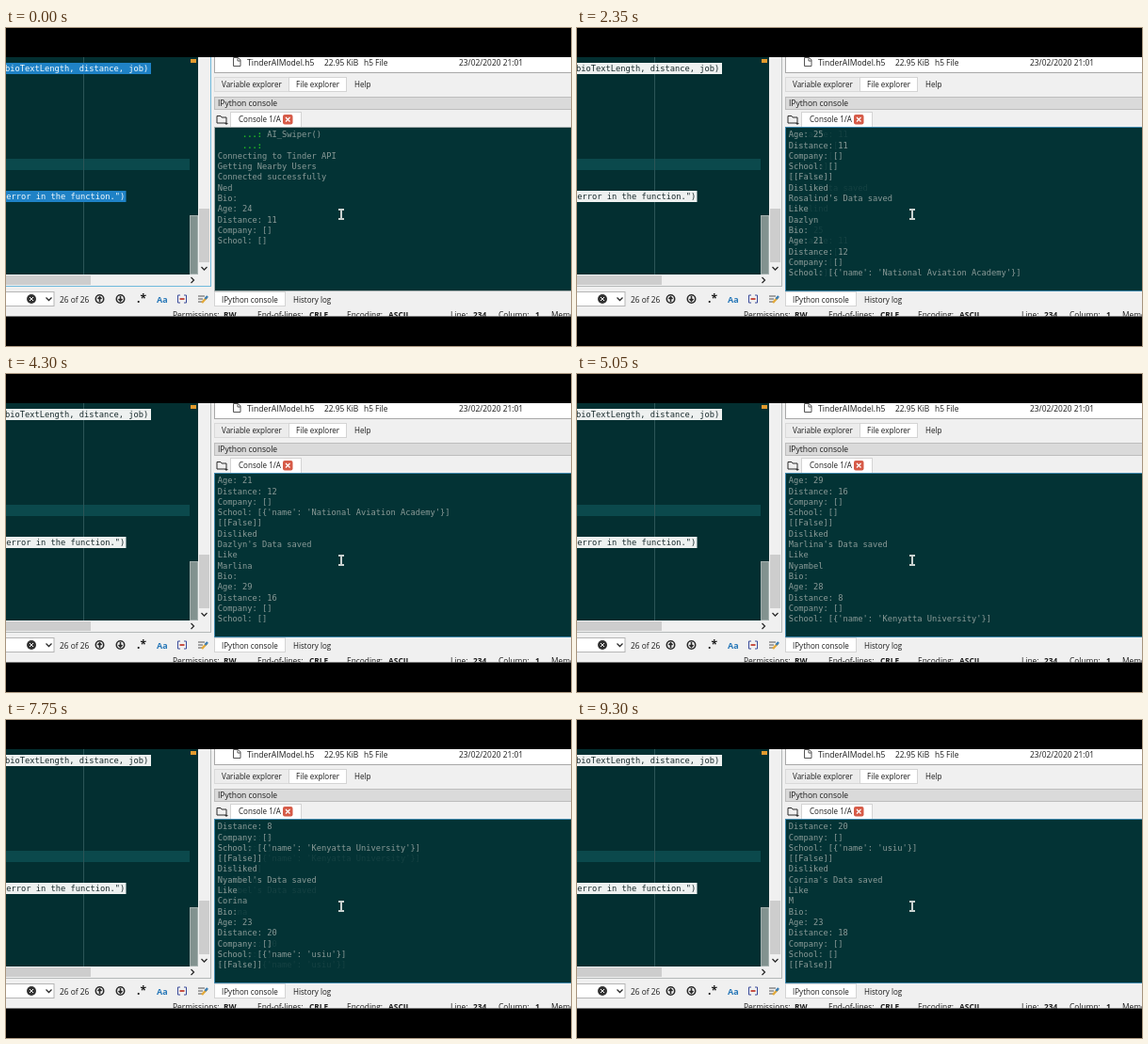
An HTML page for the animation above (9350 ms loop, 600 by 338 pixels).

```html
<!DOCTYPE html>
<html lang="en">
<head>
<meta charset="utf-8">
<title>Console run</title>
<style>
  html, body { margin: 0; width: 100%; height: 100%; overflow: hidden; background: #000; }
  svg { display: block; width: 100%; height: 100%; }
  text { font: 8.4px "Open Sans", sans-serif; fill: #1c1c1c; white-space: pre; }
  .tab { font-size: 8.05px; }
  .bold { font-weight: 700; }
  .code, .console text { font: 8.73px "DejaVu Sans Mono", monospace; }
  .console text { fill: #8b9b98; }
  .console .prompt { fill: #20b526; font-weight: 700; }
  .selection { fill: #eef1f0; }
  .code { fill: #17292b; }
  .editing .selection { fill: #1f82c6; }
  .editing .code { fill: #f4fafc; }
  .pane-border { fill: none; stroke: #3f87ab; }
  .editing .pane-border { stroke: #a5adad; }
  .editor-border { fill: none; stroke: #b4b8b8; }
  .editing .editor-border { stroke: #6fb9dc; }
  .icon { fill: none; stroke: #2b2b2b; stroke-width: 1.3; }
</style>
</head>
<body>
<svg id="stage" viewBox="0 0 600 338">
  <defs>
    <clipPath id="screen"><rect y="31" width="600" height="275.500"/></clipPath>
    <clipPath id="pane"><rect x="222" y="106" width="378" height="173"/></clipPath>
  </defs>
  <rect width="600" height="338"/>
  <g clip-path="url(#screen)">
    <rect y="31" width="600" height="276" fill="#f0f0f0"/>

    <!-- Editor -->
    <rect y="31" width="204" height="231" fill="#032f31"/>
    <rect y="139" width="195" height="12" fill="#0b494c"/>
    <path d="M82.500 31V262" stroke="#2c5557"/>
    <rect class="selection" y="37" width="154" height="12"/>
    <text class="code" x="-.9" y="46.300">bioTextLength, distance, job)</text>
    <rect class="selection" y="173" width="127.500" height="12"/>
    <text class="code" x=".3" y="182.300">error in the function.")</text>
    <rect x="196" y="33" width="6" height="4" fill="#e39a2d"/>
    <rect x="195.500" y="199.500" width="8" height="62" fill="#82928f" stroke="#a4b0ae"/>
    <rect x="205" y="192" width="11" height="57" fill="#cdcdcd"/>
    <path class="icon" d="M207.500 254l3 3 3-3M196.500 265l3 3-3 3"/>
    <rect y="263" width="90" height="10" fill="#cdcdcd"/>
    <rect class="editor-border" x="-1" y="30" width="218.500" height="244.500"/>

    <!-- Find bar -->
    <rect x="-1" y="280.500" width="52" height="15" fill="#fff" stroke="#b5b5b5"/>
    <circle cx="27" cy="288" r="5" fill="#333"/>
    <path d="M25 286l4 4m0-4l-4 4" stroke="#fff"/>
    <path class="icon" d="M42.500 286.500l3 3 3-3"/>
    <text x="57" y="291.500">26 of 26</text>
    <g class="icon" style="stroke-width:1.6">
      <circle cx="99.500" cy="288" r="4.200"/><path d="M99.500 291v-5m-2 2l2-2 2 2"/>
      <circle cx="121.500" cy="288" r="4.200"/><path d="M121.500 285v5m-2-2l2 2 2-2"/>
    </g>
    <text class="bold" x="139" y="292" style="font-size:12px">.*</text>
    <text class="bold" x="160" y="291.500" style="font-size:9px;fill:#2878b8">Aa</text>
    <path d="M185 284h-2.500v8h2.500M189 284h2.500v8H189" fill="none" stroke="#3a4b9a"/>
    <path d="M184.500 288h5" stroke="#c65045" stroke-width="1.800"/>
    <path d="M204 285h7M204 288h5M204 291h4" stroke="#555"/>
    <path d="M208 292l5.500-6" stroke="#e2a93b" stroke-width="2.500"/>
    <path d="M211.500 288l2.500-3" stroke="#3c80b8" stroke-width="2.500"/>

    <!-- File explorer -->
    <rect x="221.500" y="30" width="380" height="17.500" fill="#fff" stroke="#a8a8a8"/>
    <path d="M241.500 31.500h5l2.500 2.500v6.500h-7.500zM246 32v3h3" fill="#fff" stroke="#555"/>
    <text x="256" y="39.700" style="font-size:8.6px">TinderAIModel.h5</text>
    <text x="338" y="39.700">22.95 KiB</text>
    <text x="380" y="39.700">h5 File</text>
    <text x="481" y="39.700">23/02/2020 21:01</text>
    <rect x="221.500" y="52.500" width="79" height="15" fill="#ececec" stroke="#d9d9d9"/>
    <rect x="300.500" y="52.500" width="61" height="15" fill="#fff" stroke="#d4d4d4"/>
    <text class="tab" x="229" y="63.400">Variable explorer</text>
    <text class="tab" x="308" y="63.400">File explorer</text>
    <text class="tab" x="370" y="63.400">Help</text>

    <!-- Console pane -->
    <rect x="221.500" y="73.500" width="380" height="13" fill="#dadada" stroke="#bdbdbd"/>
    <text x="225" y="83.300" style="font-size:8.5px">IPython console</text>
    <path class="icon" d="M224 93.500h4l1 1.500h5v6h-10z" style="stroke-width:1"/>
    <path d="M232 101h4l-2 2z" fill="#333"/>
    <rect x="238.500" y="89.500" width="75" height="16" fill="#fff" stroke="#d4d4d4"/>
    <text class="tab" x="247" y="100.400">Console 1/A</text>
    <rect x="294" y="92" width="10.500" height="10.500" rx="2" fill="#d65b48"/>
    <path d="M297 95l4.500 4.500m0-4.500l-4.500 4.500" stroke="#fff" stroke-width="1.300"/>
    <rect x="221" y="105" width="379" height="175" fill="#033335"/>
    <rect class="pane-border" x="221.500" y="105.500" width="380" height="174"/>
    <g class="console" clip-path="url(#pane)">
      <g id="ghost" opacity=".13"></g>
      <g id="live"></g>
    </g>
    <path d="M353 193h6M353 203h6M356 193v10" fill="none" stroke="#c9d2d0" stroke-width="2"/>
    <rect x="221.500" y="280.500" width="75" height="15" fill="#fff" stroke="#d4d4d4"/>
    <text class="tab" x="229" y="291.500">IPython console</text>
    <text class="tab" x="305" y="291.500">History log</text>

    <!-- Status bar -->
    <g id="status"></g>
  </g>
</svg>
<script>
const LOOP = 9350, ROWS = 14, PITCH = 11.32, FADE = 110, FOCUS_AT = 500;
const $ = id => document.getElementById(id);

function addText(parent, x, y, value, className = "") {
  const node = document.createElementNS(parent.namespaceURI, "text");
  node.setAttribute("x", x);
  node.setAttribute("y", y);
  node.setAttribute("class", className);
  node.textContent = value;
  parent.append(node);
  return node;
}

[[177, "Permissions:"], [231, "RW", "bold"], [267, "End-of-lines:"], [322, "CRLF", "bold"],
 [362, "Encoding:"], [406, "ASCII", "bold"], [472, "Line:"], [496, "234", "bold"],
 [523, "Column:"], [562, "1", "bold"], [579, "Memory:"]
].forEach(([x, value, style]) => addText($("status"), x, 307.5, value, style));

// shown: when the profile prints; judged: when its prediction prints
const profiles = [
  { name: "Ned", age: 24, distance: 11, shown: 0, judged: 200 },
  { name: "Rosalind", age: 25, distance: 11, shown: 850, judged: 1700 },
  { name: "Dazlyn", age: 21, distance: 12, school: "National Aviation Academy", shown: 2350, judged: 3200 },
  { name: "Marlina", age: 29, distance: 16, shown: 3850, judged: 4450 },
  { name: "Nyambel", age: 28, distance: 8, school: "Kenyatta University", shown: 4900, judged: 5950 },
  { name: "Corina", age: 23, distance: 20, school: "usiu", shown: 6850, judged: 7700 },
  { name: "M", age: 23, distance: 18, shown: 8350, judged: 9100 }
];

const lines = ["     ...: AI_Swiper()", "     ...:", "Connecting to Tinder API",
  "Getting Nearby Users", "Connected successfully"];
const steps = [];
profiles.forEach((p, i) => {
  if (i) lines.push("Disliked", `${profiles[i - 1].name}'s Data saved`, "Like");
  const school = p.school ? `{'name': '${p.school}'}` : "";
  lines.push(p.name, "Bio:", `Age: ${p.age}`, `Distance: ${p.distance}`, "Company: []", `School: [${school}]`);
  steps.push({ time: p.shown, count: lines.length });
  lines.push("[[False]]");
  steps.push({ time: p.judged, count: lines.length });
});

function printConsole(group, count) {
  group.replaceChildren();
  lines.slice(Math.max(0, count - ROWS), count).forEach((line, row) => {
    const y = 116.2 + row * PITCH;
    const [prompt] = line.match(/^ +\.\.\.:/) || [""];
    const node = addText(group, 224.7, y, line.slice(prompt.length));
    if (prompt) {
      const dots = document.createElementNS(group.namespaceURI, "tspan");
      dots.setAttribute("class", "prompt");
      dots.textContent = prompt;
      node.prepend(dots);
    }
  });
}

let current = -1;
function draw(now) {
  const t = now % LOOP;
  const index = steps.findLastIndex(step => step.time <= t);
  if (index !== current) {
    current = index;
    printConsole($("live"), steps[index].count);
    printConsole($("ghost"), index ? steps[index - 1].count : 0);
  }
  $("ghost").style.display = t - steps[index].time < FADE ? "" : "none";
  $("stage").classList.toggle("editing", t < FOCUS_AT);
  requestAnimationFrame(draw);
}
draw(performance.now());
</script>
</body>
</html>
```
